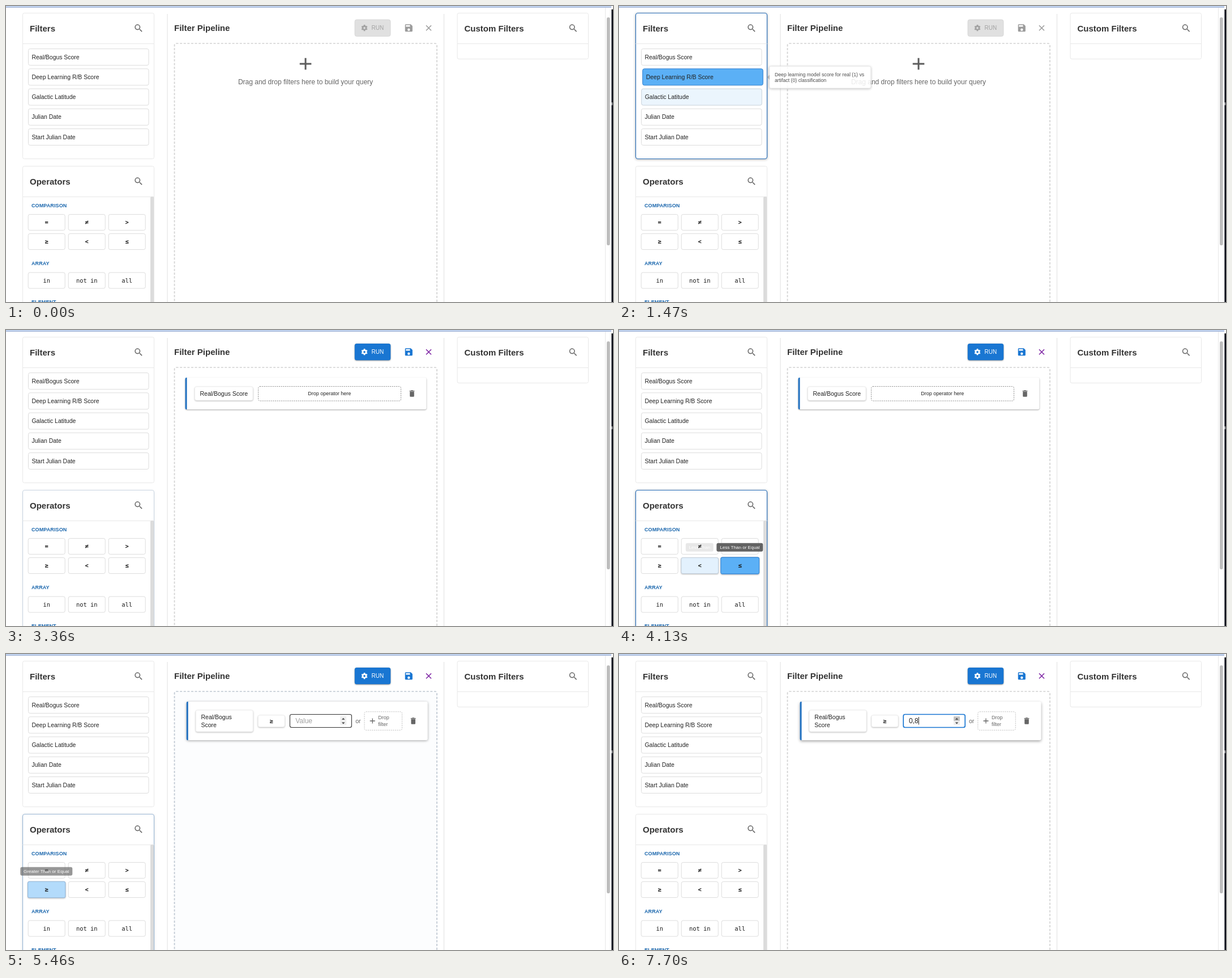
Animation, 1072 px wide and 522 px high, one loop 8 s. Source, as an HTML page:

```html
<!DOCTYPE html>
<html lang="en">
<head>
<meta charset="utf-8">
<title>Filter Pipeline</title>
<style>
  html, body { margin: 0; height: 100%; overflow: hidden; background: #fff; }
  svg { display: block; font-family: "Liberation Sans", Arial, sans-serif; }
  .mono { font-family: "DejaVu Sans Mono", monospace; }
  .low { filter: drop-shadow(0 1px 1px rgba(0,0,0,.35)); }
  .chip { filter: drop-shadow(0 1px 1.2px rgba(0,0,0,.25)); }
  .tip { filter: drop-shadow(0 1px 2px rgba(0,0,0,.28)); }
  .ghost { filter: drop-shadow(0 4px 8px rgba(0,0,0,.22)); }
</style>
</head>
<body>
<svg id="stage" width="1072" height="522" viewBox="0 0 1072 522"></svg>
<script>
const LOOP = 8000;
const BLUE = '#1976d2', SKY = '#42a5f5';
const DROP_FILTER = 2730, DROP_OPERATOR = 5310, CLICK = 6650;
const TICKS = [CLICK, 6790, 7000, 7140, 7280, 7420, 7560, 7700];

const ICONS = {
  search: 'M15.5 14h-.79l-.28-.27A6.5 6.5 0 1 0 13.73 14.43l.27.28v.79l5 4.99L20.49 19zm-6 0a4.5 4.5 0 1 1 0-9 4.5 4.5 0 0 1 0 9z',
  save: 'M17 3H5a2 2 0 0 0-2 2v14a2 2 0 0 0 2 2h14a2 2 0 0 0 2-2V7zm-5 16a3 3 0 1 1 0-6 3 3 0 0 1 0 6zm3-10H5V5h10z',
  trash: 'M6 19a2 2 0 0 0 2 2h8a2 2 0 0 0 2-2V7H6zM19 4h-3.5l-1-1h-5l-1 1H5v2h14z'
};

// Filters: label, hover start, hover end
const FILTERS = [
  ['Real/Bogus Score', 1500, DROP_FILTER],
  ['Deep Learning R/B Score', 1350, 1500],
  ['Galactic Latitude', 1220, 1340],
  ['Julian Date', 1090, 1210],
  ['Start Julian Date', 960, 1080]
];
// Operators: label, column, top, hover start, hover end, tooltip, tooltip width
const OPERATORS = [
  ['=', 0, 367.5], ['≠', 1, 367.5], ['&gt;', 2, 367.5],
  ['≥', 0, 401.5, 4260, 5350, 'Greater Than or Equal', 92],
  ['&lt;', 1, 401.5, 4120, 4250, 'Less Than', 49],
  ['≤', 2, 401.5, 3980, 4110, 'Less Than or Equal', 82],
  ['in', 0, 470], ['not in', 1, 470], ['all', 2, 470]
];

const clamp = x => Math.min(1, Math.max(0, x));
const mix = (a, b, k) => a + (b - a) * k;
const rise = (t, start, length) => 1 - (1 - clamp((t - start) / length)) ** 2;
const glide = (t, start, length) => {
  const x = clamp((t - start) / length);
  return x * x * (3 - 2 * x);
};
const pulse = (t, on, off, rise1 = 200, rise2 = rise1) => rise(t, on, rise1) * (1 - rise(t, off, rise2));

const rect = (x, y, w, h, fill, more = '') =>
  `<rect x="${x}" y="${y}" width="${w}" height="${h}" fill="${fill}" ${more}/>`;
const box = (x, y, w, h, stroke, more = '') => rect(x, y, w, h, '#fff', `rx="3" stroke="${stroke}" ${more}`);
const line = (d, stroke, width = 1, more = '') =>
  `<path d="${d}" fill="none" stroke="${stroke}" stroke-width="${width}" ${more}/>`;
const text = (s, x, y, size, fill = '#222', more = '') =>
  `<text x="${x}" y="${y}" font-size="${size}" fill="${fill}" ${more}>${s}</text>`;
const title = (s, x, y) => text(s, x, y, 15, '#333', 'font-weight="700"');
const symbol = (s, x, y) => text(s, x, y, 10.4, '#1c1c1c',
  `class="mono" text-anchor="middle" ${/[a-z]{2}$/.test(s) ? '' : 'font-weight="700"'}`);
const icon = (name, x, y, scale, fill, cx = 12) =>
  `<path d="${ICONS[name]}" fill="${fill}" fill-rule="evenodd" transform="translate(${x} ${y}) scale(${scale}) translate(${-cx} ${-cx})"/>`;
const search = (x, y) => icon('search', x, y, .76, '#666', 11.75);
const plus = (x, y, r, width, fill) => line(`M${x - r} ${y}h${2 * r}M${x} ${y - r}v${2 * r}`, fill, width);
const group = (body, attrs) => `<g ${attrs}>${body}</g>`;

function panel(x, y, w, h, name, hover = 0) {
  const glow = `style="filter:drop-shadow(0 1px 2px rgba(0,0,0,${.3 * hover}))"`;
  return box(x, y, w, h, '#e8e8e8', 'rx="4" ' + (hover ? glow : '')) +
    rect(x, y, w, h, 'none', `rx="4" stroke="#2a6fb8" stroke-width="1.2" stroke-opacity="${hover}"`) +
    line(`M${x} ${y + 54}h${w}`, '#e8e8e8') +
    title(name, x + 12.5, y + 32) + search(x + 204.5, y + 26.5);
}

function filterTip(lines, y, k) {
  if (!k) return '';
  const body = box(0, -19.5, 180.5, 39, '#e0e0e0', 'stroke-width=".8" class="tip"') +
    '<path d="M.4-4.5L-4 0 .4 4.5z" fill="#aaa"/>' +
    lines.map((s, i) => text(s, 9.5, -2 + i * 10.3, 8.8, '#333')).join('');
  return group(body, `opacity="${k}" transform="translate(265.5 ${y}) scale(${mix(.95, 1, k)})"`);
}

function filters(t) {
  return panel(29.5, 12.5, 232, 257, 'Filters', pulse(t, 910, DROP_FILTER, 300, 210)) +
    FILTERS.map(([label, on, off], i) => {
      const y = 75.5 + i * 35.25, k = pulse(t, on, off, 190);
      return group(
        box(39.5, y, 212.5, 29, '#ddd') +
        rect(39.5, y, 212.5, 29, SKY, `rx="3" stroke="${BLUE}" opacity="${k}"`) +
        text(label, 45.5, y + 18.2, 10.45), `transform="translate(${2.6 * k} 0)"`);
    }).join('');
}

function operators(t) {
  const centre = col => 71.7 + col * 71;
  let out = panel(29.5, 282.5, 232, 260, 'Operators', pulse(t, 3320, 5350, 500, 300)) +
    rect(255, 336, 6, 220, '#dcdcdc', 'rx="2.5"');
  [['COMPARISON', 355], ['ARRAY', 457], ['ELEMENT', 524.7]].forEach(([s, y]) =>
    out += text(s, 45, y, 9, '#1b67ad', 'font-weight="700" letter-spacing=".1"'));
  for (const [label, col, y, on, off] of OPERATORS) {
    const k = on ? pulse(t, on, off, 150, 300) : 0, x = centre(col);
    out += group(
      box(-32.5, -14, 65, 28, '#ddd') +
      rect(-32.5, -14, 65, 28, SKY, `rx="3" stroke="${BLUE}" opacity="${k}"`) +
      symbol(label, 0, 3.7),
      `${k ? 'class="chip"' : ''} transform="translate(${x} ${y + 14}) scale(${1 + .05 * k})"`);
  }
  for (const [, col, y, on, off, tip, width] of OPERATORS) {
    const k = on ? pulse(t, on, off + 80, 150, 170) : 0, x = centre(col) - .4;
    if (k) out += group(
      rect(x - width / 2, y - 25.7, width, 15, '#5a5a5a', 'rx="3"') +
      text(tip, x, y - 15.3, 8.1, '#fff', 'text-anchor="middle"'), `opacity="${.94 * k}"`);
  }
  return out;
}

function header(t) {
  const k = rise(t, DROP_FILTER, 200), on = t >= DROP_FILTER;
  const ink = on ? '#fff' : '#a2a2a2', bg = on ? BLUE : '#e0e0e0';
  const gear = '<circle r="3.1" fill="none" stroke-width="2.6"/>' +
    '<circle r="4.7" fill="none" stroke-width="1.8" pathLength="12" stroke-dasharray="1 1" transform="rotate(15)"/>';
  return title('Filter Pipeline', 297, 44) +
    rect(616, 24, 63, 29.5, '#e0e0e0', 'rx="3.5" stroke="#d4d4d4" stroke-width=".8"') +
    (on ? rect(615.8, 24, 63.4, 29.3, bg, `rx="3.5" class="low" opacity="${k}"`) : '') +
    group(gear, `transform="translate(633 38.7)" stroke="${ink}"`) +
    text('RUN', 645.5, 42.2, 10, ink) +
    icon('save', 711.3, 38.8, .73, on ? BLUE : '#9c9c9c') +
    line('M742 34.2l9 9m0-9l-9 9', on ? '#7b1fa2' : '#9a9a9a', 1.5);
}

function emptyRow() {
  return box(333.5, 100, 102.5, 24, '#eee', 'class="chip"') +
    text('Real/Bogus Score', 342.5, 116, 10.5) +
    box(445.5, 99.5, 252, 25.5, '#888', 'stroke-dasharray="2.2 1.5" stroke-width=".9"') +
    text('Drop operator here', 571.3, 115.2, 9, '#222', 'text-anchor="middle"') +
    icon('trash', 717, 112, .63, '#666');
}

function valueRow(t) {
  const focus = t >= CLICK, hover = t < 5740 || t >= 5950;
  const digit = TICKS.filter(s => t >= s).length;
  const border = focus ? BLUE : hover ? '#333' : '#bbb';
  let out = box(333, 99, 101, 38, '#eee', 'class="chip"') +
    text('Real/Bogus', 342.3, 114.7, 10.5) + text('Score', 342.3, 129.3, 10.5) +
    box(443, 108, 47, 20.5, '#eee', 'class="chip"') + symbol('≥', 466.5, 121.7) +
    box(499.2, 106.5, 109, 23, border, `stroke-width="${focus ? 1.7 : 1.1}"`);
  if (hover) {
    out += rect(588, 110, 11, 15.5, '#efefef', 'rx="1"') +
      (t >= 6370 ? rect(588, 110, 11, 8, '#c4c4c4', 'rx="1"') : '') +
      '<path d="M590.7 115.8l2.8-3 2.8 3zM590.7 120.6l2.8 3 2.8-3z" fill="#444"/>';
  }
  out += focus
    ? text('0,' + digit, 509, 122.2, 12, '#222') + rect(525.8, 111, 1, 13.5, '#222')
    : text('Value', 509, 122.2, 12, '#a0a0a0');
  return out + text('or', 615, 121.7, 10.5, '#666') +
    box(630.8, 101.8, 66.5, 32.5, '#bbb', 'stroke-dasharray="2.2 1.5" stroke-width=".9"') +
    plus(645, 118, 4.5, 1.3, '#666') +
    text('Drop', 655, 115, 9, '#666') + text('filter', 655, 127.3, 9, '#666') +
    icon('trash', 717, 118, .63, '#666');
}

function card(t) {
  const full = t >= DROP_OPERATOR, h = full ? 68 : 56;
  const k = rise(t, DROP_OPERATOR + 20, 270);
  const shadow = `style="filter:drop-shadow(0 ${1 + k}px ${1 + 1.6 * k}px rgba(0,0,0,.36))"`;
  return group(
    rect(316.5, 84, 426, h, '#fff', `rx="3" ${shadow}`) +
    `<path d="M319.5 84v${h}h-1q-2 0-2-3v${6 - h}q0-3 2-3z" fill="#1f6fbf"/>` +
    (full ? valueRow(t) : emptyRow()), `transform="translate(${3 * k} 0)"`);
}

function pipeline(t) {
  const active = pulse(t, 2170, DROP_FILTER, 200) + pulse(t, 4680, DROP_OPERATOR, 120, 220);
  const zone = (fill, stroke, opacity) => rect(297.5, 66, 463.5, 480, fill,
    `rx="3" stroke="${stroke}" stroke-width="1.7" stroke-dasharray="4 2.6" opacity="${opacity}"`);
  return line('M285 14V522M773.5 14V522', '#e4e4e4', 1.2) + header(t) +
    zone('#fff', '#d2d2d2', 1) + zone('#e5f2fc', BLUE, active) +
    (t < DROP_FILTER
      ? plus(529, 102, 10.3, 3, '#5c5c5c') +
        text('Drag and drop filters here to build your query', 529, 138.3, 12, '#666', 'text-anchor="middle"')
      : card(t));
}

function ghost(t) {
  const draw = (x, y, w, h, label) => group(
    rect(0, 0, w, h, SKY, `rx="3" stroke="${BLUE}"`) + label,
    `class="ghost" opacity=".9" transform="translate(${x} ${y})"`);
  if (t >= 2170 && t < DROP_FILTER) {
    const k = glide(t, 2160, 330);
    return draw(mix(42, 323, k), mix(75.5, 221, k), 212.5, 29, text('Real/Bogus Score', 6.5, 18, 10.45, '#333'));
  }
  if (t >= 4680 && t < DROP_OPERATOR) {
    const k = glide(t, 4640, 400);
    return draw(mix(39, 562, k), mix(402, 120, k), 65, 27.5, symbol('≥', 32.5, 17.5));
  }
  return '';
}

function browserEdge() {
  return rect(0, 0, 1069, 2, '#c3d4f0') + rect(0, 2, 1069, .9, '#93a9d1') +
    line('M1058.5 3V522', '#e8e8e8') + rect(1061, 20, 5.6, 402, '#bdbdbd', 'rx="2.8"') +
    rect(1069.4, 6, 2.6, 516, '#0b0e18') + rect(1069.4, 170, 1.6, 5, '#c8c8c8');
}

function scene(t) {
  return filters(t) + operators(t) + pipeline(t) +
    panel(797, 12.5, 231.5, 81, 'Custom Filters') +
    filterTip(['Deep learning model score for real (1) vs', 'artifact (0) classification'],
      125.6, pulse(t, 1350, 1500, 190, 120)) +
    filterTip(['ML score indicating if the detected object', 'is real (1) or an artifact (0)'],
      90.2, pulse(t, 1510, 2880, 170, 200)) +
    ghost(t) + browserEdge();
}

const stage = document.getElementById('stage');
function frame() {
  stage.innerHTML = scene(performance.now() % LOOP);
  requestAnimationFrame(frame);
}
frame();
</script>
</body>
</html>
```
